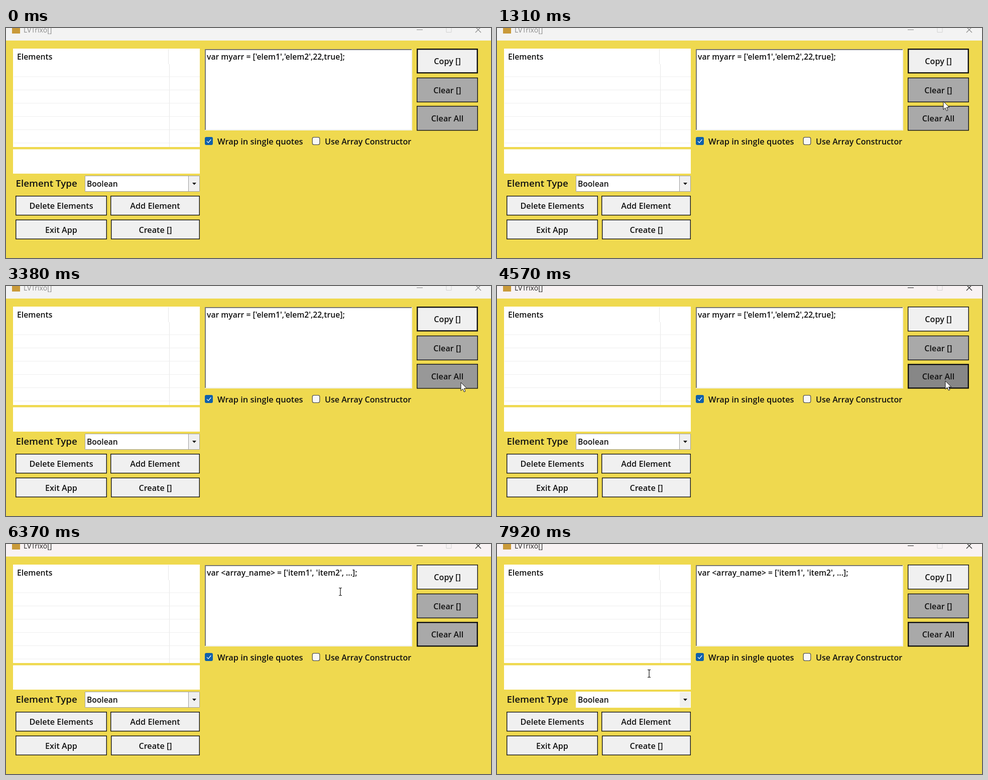
Animation, 966 px wide and 458 px high, one loop 7990 ms. Source, as an HTML page:

```html
<!DOCTYPE html>
<html lang="en">
<head>
<meta charset="utf-8">
<title>Array builder</title>
<style>
html, body { margin: 0; width: 100%; height: 100%; overflow: hidden; background: #efd94f; }
svg { display: block; width: 966px; height: 458px; font: 600 16.2px "Open Sans", "Noto Sans", sans-serif; fill: #111; }
</style>
</head>
<body>
<svg id="stage" viewBox="0 0 966 458"></svg>
<script>
const LOOP = 7990, STEP = 1000 / 15, START = 560, CLICK = 4570, CLEARED = 4770;
const stage = document.getElementById('stage');

function set(el, attrs) {
  for (const k in attrs) el.setAttribute(k, attrs[k]);
}
function add(tag, attrs, text) {
  const el = document.createElementNS('http://www.w3.org/2000/svg', tag);
  set(el, attrs);
  if (text) el.textContent = text;
  stage.appendChild(el);
  return el;
}
const rect = (x, y, width, height, fill, more) => add('rect', { x, y, width, height, fill, ...more });
const path = (d, stroke, width = 1) => add('path', { d, stroke, 'stroke-width': width, fill: 'none' });
const label = (x, y, text, size = 16.2, more) => add('text', { x, y, 'font-size': size, ...more }, text);
const show = (el, on) => set(el, { visibility: on ? 'visible' : 'hidden' });

function button(x, y, w, h, text, fill = '#f0f0f0', hover = '#d8d8d8') {
  const b = { x, y, w, h, fill, hover, box: rect(x, y, w, h, fill, { stroke: '#111' }) };
  label(x + w / 2, y + h / 2 + 6.5, text, 16.2, { 'text-anchor': 'middle' });
  outline(b, 1.4);
  return b;
}
function outline({ box, x, y, w, h }, s) {
  set(box, { x: x + s / 2, y: y + s / 2, width: w - s, height: h - s, 'stroke-width': s });
}

// title bar
const bar = rect(0, 0, 966, 25, '#f3f3f3');
rect(12, -5, 16, 16, '#c99a3a');
const title = label(35, 9, 'LVTrixo[]', 14, { 'font-weight': 400 });
const controls = path('M818 3.5H830M935 -2L946 9M946 -2L935 9', '#888', 1.2);
path('M877 -2V8.5H887V-2', '#d2d2d2');

// element list
rect(14, 41, 372, 196, '#fff');
path('M323.5 42V72M325.5 72V237', '#e6e6e6');
for (let i = 0; i < 6; i++) path(`M15 ${97 + i * 26.4}H386`, '#ededed');
label(22, 63, 'Elements', 15.8);
const input = { x: 14, y: 241.5, w: 372, h: 48.5 };
rect(input.x, input.y, input.w, input.h, '#fff');

// type picker
const picker = { x: 157, y: 294, w: 229, h: 32 };
label(19.5, 316, 'Element Type', 18.8);
rect(picker.x, picker.y, picker.w, picker.h, '#fff');
rect(364, 295, 21, 30, '#f0f0f0');
const frame = path('M157.5 294.5H385.5V325.5H157.5ZM363.5 295V325', '#a0a0a0');
label(161, 316, 'Boolean', 15.6);
add('path', { d: 'M371 308h8l-4 4.5z' });

// result box and options
const output = { x: 396, y: 42, w: 413, h: 162 };
rect(output.x, output.y, output.w, output.h, '#fff');
path('M397 203V43H808', '#777', 2);
path('M398 203H808V44', '#e3e3e3');
const result = label(400, 63, ' ', 15.7);
rect(396, 217, 16, 16, '#0f60ab', { rx: 3 });
path('M400 225.3L403 228.3L408.3 222', '#fff', 1.2);
label(421, 232, 'Wrap in single quotes', 16.45);
rect(610.2, 217.7, 14.6, 14.6, '#f8f8f8', { rx: 3, stroke: '#555', 'stroke-width': 1.3 });
label(635, 232, 'Use Array Constructor', 16.1);

button(19, 334, 182, 39.3, 'Delete Elements');
button(19, 381.5, 182, 39.3, 'Exit App');
button(209, 381.5, 177, 39.3, 'Create []');
const addBtn = button(208, 334, 178, 39.3, 'Add Element');
const copyBtn = button(818, 41, 122, 49.5, 'Copy []');
const clearBtn = button(818, 98.7, 122, 49.3, 'Clear []', '#a9a9a9', '#989898');
const allBtn = button(818, 155, 122, 49.5, 'Clear All', '#a9a9a9', '#989898');

const arrow = add('path', { d: 'M0 0V16.5L3.8 12.9L6.4 18.8L9 17.7L6.5 12H11.8Z', fill: '#fff', stroke: '#111', 'stroke-linejoin': 'round' });
const beam = path('M-3 -7.5H-1L0 -6.5L1 -7.5H3M0 -6.5V6.5M-3 7.5H-1L0 6.5L1 7.5H3', '#111', 1.2);

// pointer moves: begin, end, x and y reached
const moves = [
  [0, START, 900, 379],
  [560, 1090, 889, 160], [1160, 1293, 889, 146], [1293, 1425, 885, 136],
  [1840, 2290, 917, 130], [2290, 2690, 876, 139],
  [2840, 3360, 906, 192], [3360, 3626, 848, 196], [3640, 3893, 893, 189],
  [5630, 5690, 815, 164], [5690, 6090, 510, 70], [6090, 6426, 684, 98],
  [6430, 6626, 648, 213], [6626, 7026, 249, 332],
  [7190, 7360, 297, 316], [7660, 7890, 303, 258]
];
const ease = f => f * f * (3 - 2 * f);
const snap = t => START + Math.floor((t - START) / STEP) * STEP;

function pointer(t) {
  if (t < START) return [-50, -50];
  let x = 0, y = 0;
  for (const [from, to, tx, ty] of moves) {
    const f = ease(Math.min(1, Math.max(0, (t - from) / (to - from))));
    x += (tx - x) * f;
    y += (ty - y) * f;
  }
  return [x, y];
}
const inside = ([x, y], b) => x >= b.x && x < b.x + b.w && y >= b.y && y < b.y + b.h;

function draw(t) {
  const now = pointer(snap(t)), before = pointer(snap(t) - STEP);
  const overText = inside(now, output) || inside(now, input);
  const transform = `translate(${now.map(v => Math.round(v))})`;
  set(arrow, { transform });
  set(beam, { transform });
  show(arrow, !overText);
  show(beam, overText);

  const active = t >= CLICK;
  set(bar, { fill: active ? '#f8f2f3' : '#f3f3f3' });
  set(title, { fill: active ? '#222' : '#8b8b8b' });
  set(controls, { stroke: active ? '#222' : '#888' });
  outline(copyBtn, active ? 1.4 : 2.4);
  outline(allBtn, active ? 2.4 : 1.4);
  result.textContent = t < CLEARED ? "var myarr = ['elem1','elem2',22,true];" : "var <array_name> = ['item1', 'item2', ...];";

  // hover shades trail the pointer by one step
  for (const b of [addBtn, clearBtn, allBtn]) set(b.box, { fill: inside(before, b) ? b.hover : b.fill });
  if (active && t < CLEARED) set(allBtn.box, { fill: '#878787' });
  // the border stays until the pointer first leaves the picker
  show(frame, t < 7000 || inside(before, picker));
}

function tick(now) {
  draw(now % LOOP);
  requestAnimationFrame(tick);
}
draw(0);
requestAnimationFrame(tick);
</script>
</body>
</html>
```
